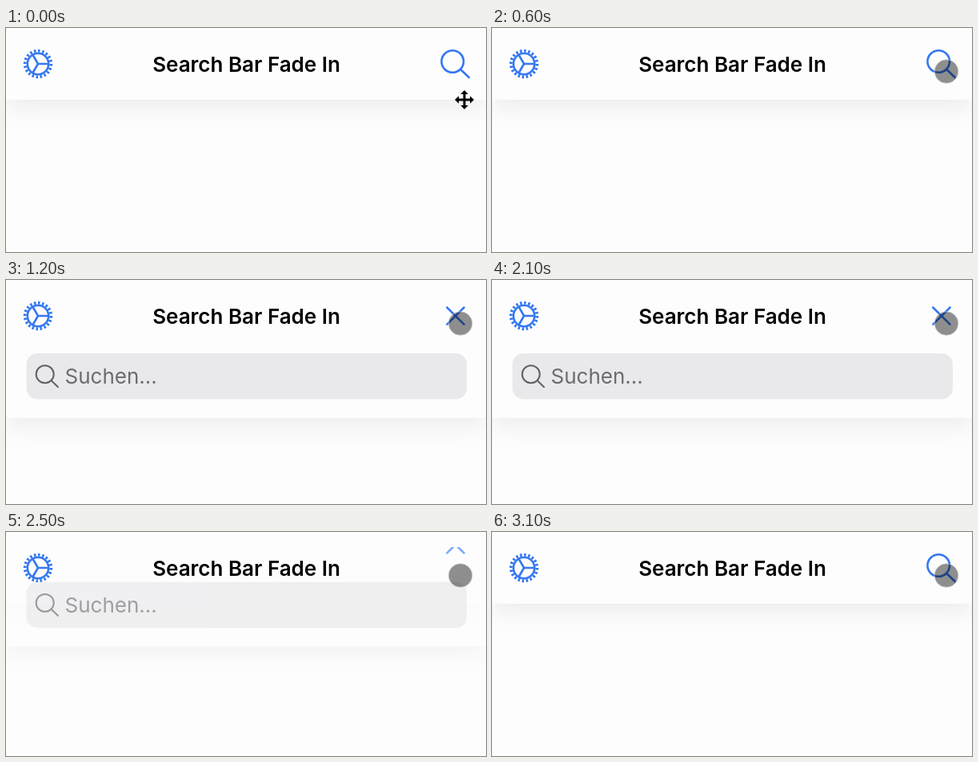
Animation of 600x281 px, one loop 3.2 s. Source, as an HTML page:

```html
<!DOCTYPE html>
<html lang="en">
<head>
<meta charset="utf-8">
<title>Search Bar Fade In</title>
<style>
  html, body { margin: 0; width: 100%; height: 100%; overflow: hidden; background: #fefdfe; }
  svg { display: block; width: 600px; height: 281px; }
  text { font: 26px Inter, sans-serif; }
  .panel { fill: #fefdfe; filter: drop-shadow(0 10px 15px rgba(0, 0, 0, .065)); }
  .icon { fill: none; stroke: #3478f0; stroke-width: 2.6; stroke-linecap: round; }
</style>
</head>
<body>
<svg viewBox="0 0 600 281">
  <defs>
    <clipPath id="screen"><rect y="19" width="600" height="262"/></clipPath>
    <path id="arrow" d="M-1.5 0V-7H-4.8L0 -12L4.8 -7H1.5V0Z"/>
  </defs>

  <rect id="header" class="panel" width="600" height="90"/>
  <g clip-path="url(#screen)"><rect id="drawer" class="panel" width="600" height="173"/></g>

  <g class="icon" transform="translate(40 45)">
    <circle r="13.2"/>
    <circle r="16.3" stroke-width="3.8" stroke-linecap="butt" pathLength="20" stroke-dasharray=".5 .5"/>
    <path d="M13 0H0L-6.5 -11.26M0 0L-6.5 11.26"/>
  </g>
  <text x="300.5" y="54.5" text-anchor="middle" style="font-weight:600">Search Bar Fade In</text>

  <g clip-path="url(#screen)">
    <g id="field">
      <rect x="25.5" y="92" width="550.5" height="57.5" rx="14" fill="#e9e8ea"/>
      <g fill="none" stroke="#626165" stroke-width="2" stroke-linecap="round">
        <circle cx="48.7" cy="118.2" r="11"/>
        <path d="M56.7 126.2L65 134.3"/>
      </g>
      <text x="73.5" y="130" fill="#6c6b6e">Suchen...</text>
    </g>
    <path id="close" class="icon" d="M551.3 34.5L572.5 55.7M572.5 34.5L551.3 55.7"/>
    <g id="search" class="icon">
      <circle cx="558.2" cy="42" r="13.8"/>
      <path d="M568.2 52L578.7 62"/>
    </g>
  </g>

  <circle id="touch" cx="568" cy="54.5" r="14.8" fill="#000" fill-opacity=".44" stroke="#ccc" stroke-opacity=".7"/>
  <g id="pointer">
    <use href="#arrow"/>
    <use href="#arrow" transform="rotate(90)"/>
    <use href="#arrow" transform="rotate(180)"/>
    <use href="#arrow" transform="rotate(270)"/>
  </g>
</svg>
<script>
  const LOOP = 3200, STEP = 100, TRAVEL = 83;
  const el = id => document.getElementById(id);

  function ease(t, start, duration) {
    const x = Math.min(1, Math.max(0, (t - start) / duration));
    return x * x * (3 - 2 * x);
  }

  function place(id, x, y, opacity) {
    el(id).setAttribute('transform', `translate(${x} ${y})`);
    el(id).setAttribute('opacity', opacity);
  }

  function draw(now) {
    const t = Math.floor(now % LOOP / STEP) * STEP;
    const open = ease(t, 772, 417) - ease(t, 2333, 417);
    const lift = TRAVEL * (open - 1);

    place('header', 0, 0, 1 - open);
    for (const id of ['drawer', 'field', 'close']) place(id, 0, lift, open);
    place('search', 0, -TRAVEL * open, 1 - open);

    const move = ease(t, 0, 500);
    const touching = t >= 600;
    place('pointer', 573 - 5 * move, 90 - 35.5 * move, touching ? 0 : 1);
    place('touch', 0, 0, touching ? 1 : 0);
  }

  const start = performance.now();
  function tick() {
    draw(performance.now() - start);
    requestAnimationFrame(tick);
  }
  tick();
</script>
</body>
</html>
```
